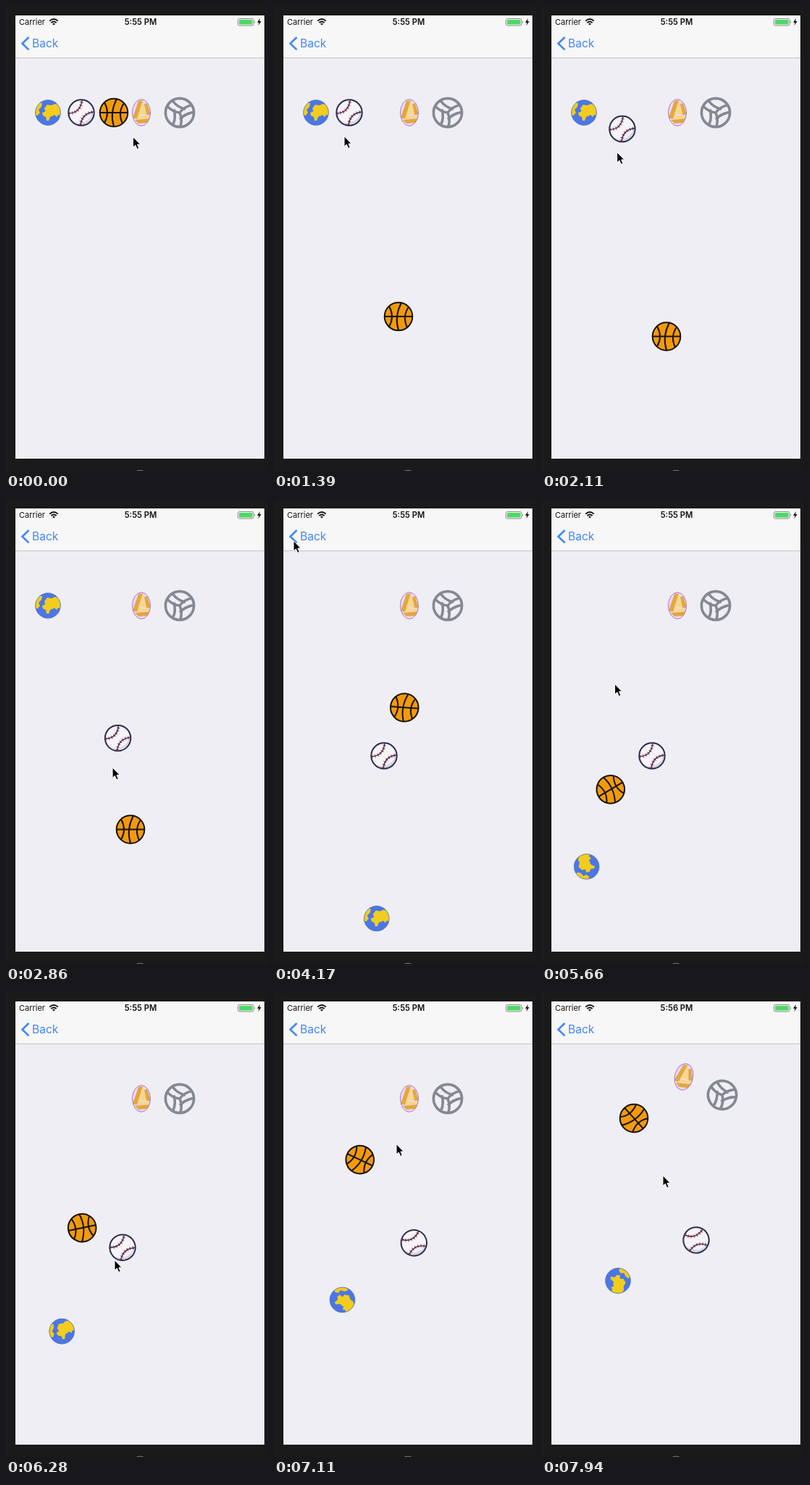
Recreate the animation shown at these times as an HTML page. Size 362x641 px, loop 7990 ms.

```html
<!DOCTYPE html>
<html lang="en">
<meta charset="utf-8">
<title>Bouncing balls</title>
<style>
  html, body { margin: 0; height: 100%; overflow: hidden; background: #1a1a1a }
  svg { display: block; width: 100vw; height: 100vh }
  text { font-family: Inter, "Liberation Sans", sans-serif }
</style>
<svg viewBox="0 0 362 641">
  <defs>
    <clipPath id="disc"><circle r="17.5"/></clipPath>
    <clipPath id="egg"><ellipse rx="12.6" ry="18.4"/></clipPath>
    <path id="panel" d="M0 0Q4 9 1 19M-8-4.6Q-5 7-9 16"/>
  </defs>
  <path fill="#efeef4" d="M13 13H357V624H13Z"/>
  <path fill="#f7f7f7" d="M13 13H357V71H13Z"/>
  <path fill="#c4c4c7" d="M13 71H357V72H13Z"/>
  <circle cx="185" cy="651" r="11" fill="#333" stroke="#777"/>

  <text x="18" y="26" font-size="11" fill="#111">Carrier</text>
  <g transform="translate(66 26)" fill="none" stroke="#111" stroke-width="1.9">
    <path d="M-5.8-5.4Q0-10.6 5.8-5.4M-3.6-3Q0-6.2 3.6-3"/>
    <path d="M0 .6L-2-1.4Q0-3 2-1.4Z" fill="#111" stroke="none"/>
  </g>
  <text id="clock" x="186" y="26" font-size="11.2" font-weight="600" text-anchor="middle" fill="#111">5:55 PM</text>
  <rect x="320.5" y="17.5" width="21.5" height="9.5" rx="2" fill="none" stroke="#8b8b8b"/>
  <rect x="322" y="19" width="18.5" height="6.5" rx="1" fill="#4cd964"/>
  <path d="M343 20.5Q345 22.2 343 24Z" fill="#8b8b8b"/>
  <path d="M351 17L347 22.8H349.5L348.5 27L352.7 21H350.2Z" fill="#111"/>
  <path d="M31.5 43L22.5 51.7L31.5 60.4" fill="none" stroke="#4388f6" stroke-width="2.7"/>
  <text x="36" y="57" font-size="15.6" fill="#4388f6">Back</text>

  <g id="world">
    <circle r="17.5" fill="#4b76e6"/>
    <g clip-path="url(#disc)" fill="#f2cd1d">
      <path d="M-18-8L-13-14L-8-13L-9-8L-13-4L-11 0L-14 4L-18 3Z"/>
      <path d="M-5-6L-1-11L5-10L9-12L18-10V4L14 3L12 6L9 3L6 5L3 1L-3 0Z"/>
      <path d="M-8 0L-3-2L3 0L6 4L3 6L1 11L-2 11L-3 6L-7 4Z"/>
    </g>
    <circle r="17.3" fill="none" stroke="#5b7ab0" stroke-width=".8"/>
  </g>

  <g id="baseball" fill="none">
    <circle r="17.7" fill="#f5f4f8" stroke="#2b2e4f" stroke-width="2"/>
    <path d="M-11 12.5A16.5 16.5 0 0 0 16-3A19 19 0 0 1-11 12.5Z" fill="#d3d7e6"/>
    <path d="M-17 1Q-1 0 1-17M-1 17Q1 1 17-1" stroke="#d0505c" stroke-width="4.6" stroke-dasharray="1.3 2.8"/>
    <path d="M-17 1Q-1 0 1-17M-1 17Q1 1 17-1" stroke="#2b2e4f" stroke-width="1.4"/>
  </g>

  <g id="oval">
    <ellipse rx="12.6" ry="18.4" fill="#f2d6f6"/>
    <g clip-path="url(#egg)">
      <path d="M-4-16L2-17L-6 9L-12 7Z" fill="#e2a83e"/>
      <path d="M2-17L4-10L-2 4L-6 9Z" fill="#f6d78d"/>
      <path d="M4-12L8-13L13 3L7 3Z" fill="#e2a83e"/>
      <path d="M4-10L7 3L-1 2Z" fill="#f6d78d"/>
      <path d="M-3 4L12 4V8L-7 9Z" fill="#f6d78d"/>
      <path d="M-9 10L12 8L8 14L-4 15Z" fill="#e2a83e"/>
    </g>
    <ellipse rx="12.5" ry="18.3" fill="none" stroke="#a67cc4"/>
  </g>

  <g id="volley" fill="none" stroke="#848893" stroke-width="3.6">
    <circle r="19.6"/>
    <use href="#panel"/>
    <use href="#panel" transform="rotate(120)"/>
    <use href="#panel" transform="rotate(240)"/>
  </g>

  <g id="basket" fill="none" stroke="#15120e" stroke-width="2">
    <circle r="19.3" fill="#f29a0b"/>
    <path d="M-19 0H19M4-19Q-6 0 0 19M-13-14Q-5 0-13 14M14-13Q5 0 12 15"/>
  </g>

  <path id="cursor" d="M0 0V14.3L3.3 11.3L5.7 16.8L8.2 15.7L5.9 10.4H10.2Z" stroke="#fff"/>
</svg>
<script>
  const LOOP = 7990;

  // Each body rests at a start place; every push slides it, slowing down,
  // from one time to another: [from, to, x, y, angle].
  const bodies = {
    world: { at: [58, 147], pushes: [
      [3800, 4210, 145, 595], [4210, 5100, 46, 546, 200], [5100, 7940, 105, 398, 470]] },
    baseball: { at: [104, 147], pushes: [
      [2080, 2400, 156, 316], [2400, 4100, 152, 354], [6080, 7940, 213, 342, 28]] },
    basket: { at: [149, 147], pushes: [
      [550, 770, 172, 399], [980, 2000, 172, 455.5], [3460, 3900, 73, 181],
      [4010, 4500, 324, 430, 10], [4500, 5240, 84, 481, 136],
      [5240, 6060, 101, 354, 157], [6060, 7940, 127, 174, 228]] },
    oval: { at: [187, 147], pushes: [[7560, 7940, 196, 117, 12]] },
    volley: { at: [240, 147], pushes: [[7620, 7940, 249, 142, 10]] },
    cursor: { at: [175.5, 180.5], pushes: [
      [240, 400, 147, 142], [550, 770, 169, 394], [980, 1390, 97, 179.5],
      [2080, 2400, 147, 345], [2640, 2860, 147, 370], [2860, 3430, 176, 453],
      [3460, 4170, 27, 57.5], [4280, 5000, 28, 87], [5100, 6280, 150, 369.5],
      [6300, 7500, 174, 168], [7560, 7940, 167, 253]] }
  };

  const clamp = u => Math.min(1, Math.max(0, u));
  const glide = u => 1 - (1 - clamp(u)) ** 1.4;

  function pose({ at: [x, y], pushes }, t) {
    let angle = 0;
    for (const [from, to, toX, toY, toAngle = 0] of pushes) {
      const k = glide((t - from) / (to - from));
      x += (toX - x) * k;
      y += (toY - y) * k;
      angle += (toAngle - angle) * k;
    }
    return `translate(${x} ${y}) rotate(${angle})`;
  }

  const find = id => document.getElementById(id);

  function draw() {
    const t = performance.now() % LOOP;
    for (const id in bodies) find(id).setAttribute('transform', pose(bodies[id], t));
    find('clock').textContent = t < 7700 ? '5:55 PM' : '5:56 PM';
    requestAnimationFrame(draw);
  }
  draw();
</script>
</html>
```
